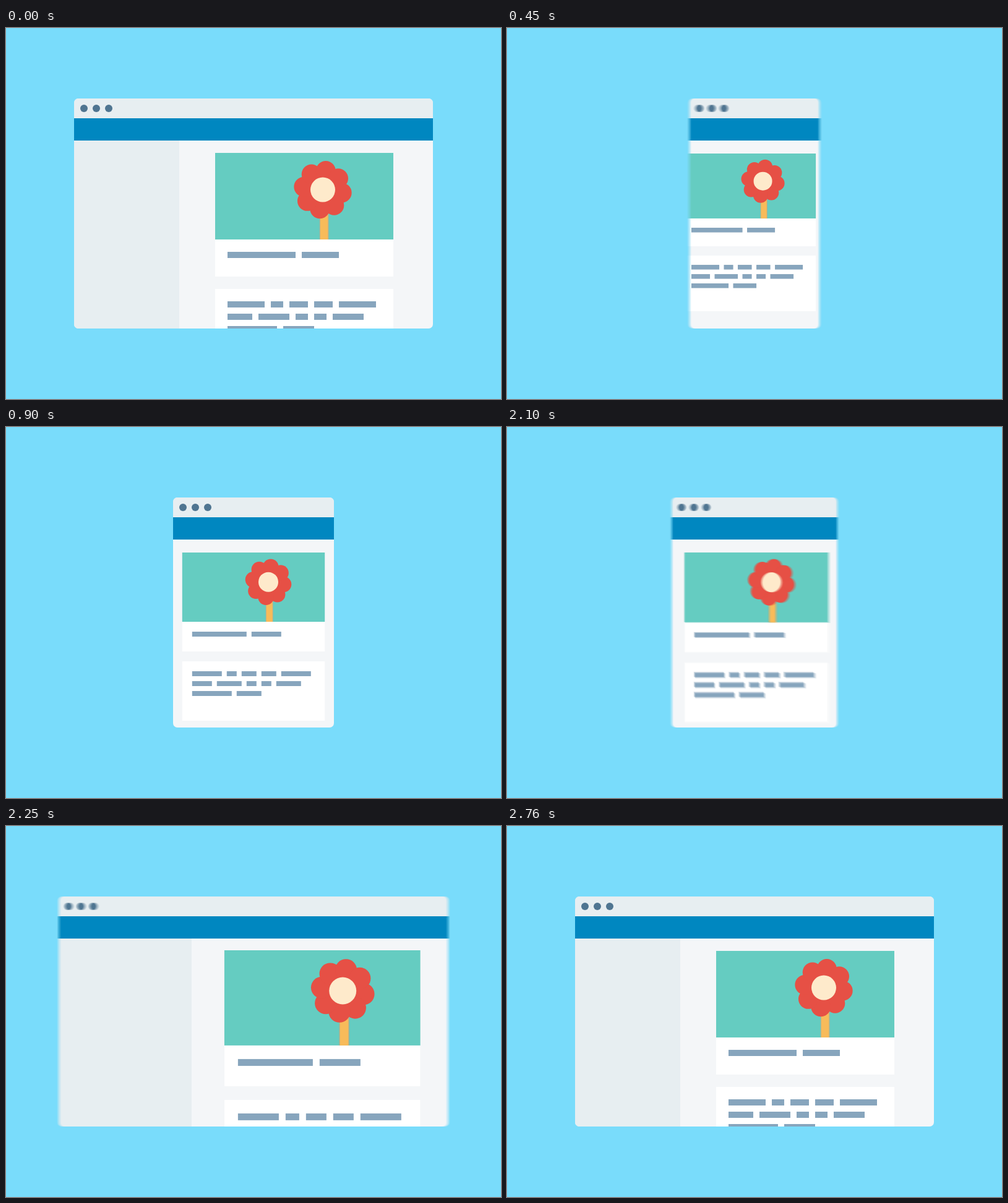
An HTML page with a canvas for the animation above (3480 ms loop, 800 by 600 pixels).

```html
<!DOCTYPE html>
<html lang="en">
<head>
<meta charset="utf-8">
<title>Responsive window</title>
<style>
  html, body { margin: 0; width: 100%; height: 100%; overflow: hidden; background: #79dcfb; }
  canvas { display: block; }
</style>
</head>
<body>
<canvas id="stage" width="800" height="600"></canvas>
<script>
const LOOP = 3480, STEP = 30, SETTLE = 13.6;
const SHRINK = 300, EXPAND = 2100;
const SAMPLES = 8, SHUTTER = [0.35, 0.75];

const stage = document.getElementById('stage').getContext('2d');
const buffer = document.createElement('canvas');
buffer.width = 800;
buffer.height = 600;
const ctx = buffer.getContext('2d');

// Each pose: window left, sidebar right edge, card left, card top, card scale.
const wide = { left: 110, side: 280, x: 338, y: 202, scale: 1 };
const narrow = { left: 270, side: 180, x: 284.8, y: 203, scale: 0.8 };
const wideOver = { left: 80, side: 300, x: 353, y: 201, scale: 1.1 };
const narrowOver = { left: 300, side: 180, x: 283, y: 203, scale: 0.75 };

// Text bars: top, then pairs of left and width.
const lines = [
  [160, 20, 110, 140, 60],
  [240, 20, 60, 90, 20, 120, 30, 160, 30, 200, 60],
  [260, 20, 40, 70, 50, 130, 20, 160, 20, 190, 50],
  [280, 20, 80, 110, 50]
];

const ease = p => (1 - Math.cos(Math.PI * Math.min(1, Math.max(0, p)))) / 2;
const mix = (a, b, p) => a + (b - a) * p;

function pose(f, from, over, to) {
  const result = {};
  for (const key in from) {
    const peak = key === 'left' ? 6.2 : 5.2;
    result[key] = f < peak
      ? mix(from[key], over[key], ease(f / peak))
      : mix(over[key], to[key], ease((f - peak) / (SETTLE - peak)));
  }
  if (to === narrow) result.y -= 2.3 * Math.sin(Math.PI * ease(f / 5.2));
  return result;
}

function rect(color, x, y, w, h) {
  ctx.fillStyle = color;
  ctx.fillRect(x, y, w, h);
}

function circle(color, x, y, r) {
  ctx.fillStyle = color;
  ctx.beginPath();
  ctx.arc(x, y, r, 0, 2 * Math.PI);
  ctx.fill();
}

function drawFlower() {
  const x = 174, y = 59.6;
  rect('#a5b39b', 168.6, y, 15.2, 140 - y);
  rect('#f8bb5a', 169.8, y, 12.6, 140 - y);
  circle('#e65045', x, y, 32);
  for (let i = 0; i < 8; i++) {
    const a = i * Math.PI / 4 + 0.155;
    circle('#e65045', x + 31 * Math.cos(a), y + 31 * Math.sin(a), 16);
  }
  circle('#feeacb', x, y, 20);
}

function drawCards() {
  rect('#65ccc1', 0, 0, 288, 140);
  rect('#fff', 0, 140, 288, 60);
  rect('#fff', 0, 220, 288, 120);
  drawFlower();
  for (const [top, ...bars] of lines)
    for (let i = 0; i < bars.length; i += 2)
      rect('#87a5bd', bars[i], top, bars[i + 1], 10);
}

function drawScene({ left, side, x, y, scale }) {
  const width = 800 - 2 * left;
  rect('#79dcfb', 0, 0, 800, 600);
  ctx.save();
  ctx.beginPath();
  ctx.roundRect(left, 114, width, 372, 7);
  ctx.clip();
  rect('#f4f6f8', left, 114, width, 372);
  rect('#e7eef1', left, 182, Math.max(0, side - left), 304);
  ctx.save();
  ctx.translate(x, y);
  ctx.scale(scale, scale);
  drawCards();
  ctx.restore();
  rect('#e7eef1', left, 114, width, 32);
  rect('#0087c0', left, 146, width, 36);
  for (const offset of [16, 36, 56]) circle('#4f7591', left + offset, 130, 6);
  ctx.restore();
}

function render(time) {
  const frame = Math.floor(time % LOOP / STEP);
  const expanding = frame >= EXPAND / STEP;
  const f = frame - (expanding ? EXPAND : SHRINK) / STEP;
  const path = expanding ? [narrow, wideOver, wide] : [wide, narrowOver, narrow];
  const samples = f >= 0 && f < SETTLE ? SAMPLES : 1;
  // Average several moments of the open shutter for motion blur.
  for (let i = 0; i < samples; i++) {
    const offset = samples > 1 ? mix(...SHUTTER, i / (samples - 1)) : 0;
    drawScene(pose(f + offset, ...path));
    stage.globalAlpha = 1 / (i + 1);
    stage.drawImage(buffer, 0, 0);
  }
}

const start = performance.now();
function tick() {
  render(performance.now() - start);
  requestAnimationFrame(tick);
}
tick();
</script>
</body>
</html>
```
